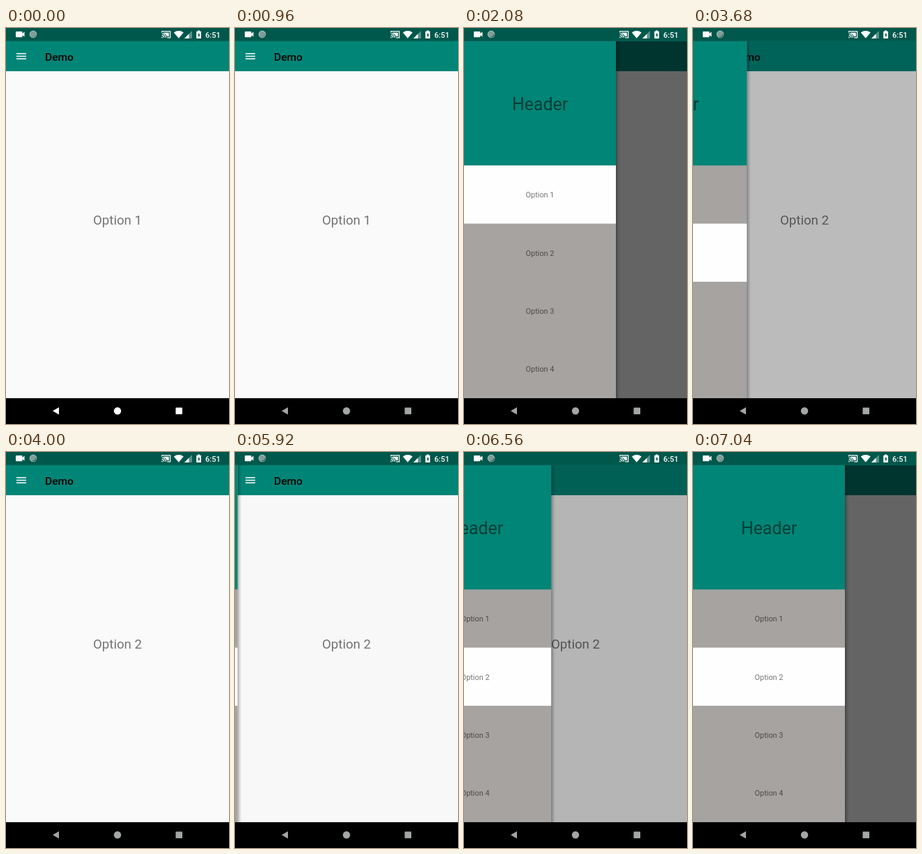
These frames come from a looping animation (320 by 568 pixels, 8000 ms). An HTML page:

```html
<!DOCTYPE html>
<html lang="en">
<head>
<meta charset="utf-8">
<title>Drawer demo</title>
<style>
  html, body { margin: 0; width: 100%; height: 100%; overflow: hidden; background: #000; }
  svg { display: block; width: 100vw; height: 100vh; }
  text { font-family: Roboto, sans-serif; fill: rgba(0, 0, 0, .54); }
  .mid { text-anchor: middle; }
  .medium { font-weight: 500; }
  .white { fill: #fff; }
  .line { fill: none; stroke: #fff; stroke-width: 1.2; }
</style>
</head>
<body>
<svg viewBox="0 0 320 568">
  <defs>
    <clipPath id="stage"><rect y="18.7" width="320" height="512.3"/></clipPath>
    <linearGradient id="shade">
      <stop offset="0" stop-opacity=".34"/>
      <stop offset=".45" stop-opacity=".13"/>
      <stop offset="1" stop-opacity="0"/>
    </linearGradient>
  </defs>

  <g id="page">
    <rect y="62" width="320" height="469" fill="#fafafa"/>
    <rect y="18" width="320" height="44" fill="#008577"/>
    <path class="white" d="M15 36h14v1.5h-14zM15 39.8h14v1.5h-14zM15 43.6h14v1.5h-14z"/>
    <text class="medium" x="56" y="46.6" font-size="15.56" style="fill:#000">Demo</text>
    <text class="mid" id="choice" x="160" y="282" font-size="18.67">Option 1</text>
  </g>
  <rect id="scrim" y="18.7" width="320" height="512.3" opacity="0"/>

  <g clip-path="url(#stage)">
    <g id="drawer">
      <rect x="218" y="18" width="6" height="513" fill="url(#shade)"/>
      <rect y="18" width="218" height="513" fill="#a6a3a1"/>
      <rect y="18" width="218" height="179.2" fill="#008577"/>
      <rect id="marker" width="218" height="83.4" fill="#fefefe"/>
      <text class="mid" x="109" y="118" font-size="24.9">Header</text>
      <g id="items" class="mid" font-size="10.9"></g>
    </g>
  </g>

  <!-- status bar -->
  <rect width="320" height="18.7" fill="#00574b"/>
  <path class="white" d="M15 5h7.5q1 0 1 1v2l3-2.4v7l-3-2.4v2q0 1-1 1h-7.5q-1 0-1-1v-6.200q0-1 1-1z"/>
  <circle cx="39" cy="9" r="4.8" fill="#7f9f99" stroke="#b3c5c2"/>
  <path id="arc" d="M43 8.500a4 4 0 0 1-5 4.300" fill="none" stroke="#2f6b62" stroke-width="1.300"/>
  <path class="line" d="M223.700 6.500v-1.700h12v9h-4.500M223.700 8.200a5.600 5.600 0 0 1 5.600 5.600M223.700 10.700a3.100 3.100 0 0 1 3.100 3.100"/>
  <path class="white" d="M226 6.700h7.800v5.300h-2.800q-1.200-3.300-5-4.500zM223.200 12.400a1.900 1.900 0 0 1 1.900 1.900h-1.900z"/>
  <path class="white" d="M240.800 6.500q7-4.800 14 0l-7 8.200z"/>
  <path class="white" d="M267 4v11h-11z" opacity=".35"/>
  <path class="white" d="M262.500 8.500v6.500h-6.500z"/>
  <path class="white" d="M275.200 3.500h2.800v1.200h2v10.300h-6.800v-10.300h2z"/>
  <path d="M277.300 6.500l-2.400 4h1.500v3l2.400-4h-1.500z" fill="#00574b"/>
  <text class="medium" x="286" y="13.6" font-size="11" style="fill:#fff">6:51</text>

  <!-- navigation bar -->
  <rect y="531" width="320" height="37"/>
  <g id="nav">
    <path d="M67 549.200l9-5.200v10.400z" stroke-linejoin="round"/>
    <circle cx="160" cy="549.200" r="5.200"/>
    <rect x="243.500" y="544.500" width="9.500" height="9.500" rx=".5"/>
  </g>
</svg>
<script>
  const LOOP = 8000, STEP = 160, WIDTH = 218, ROW = 83.4, TOP = 197.2;
  const $ = id => document.getElementById(id);
  const clamp = v => Math.max(0, Math.min(1, v));
  const lerp = (a, b, u) => a + (b - a) * clamp(u);

  // Quintic deceleration used by the drawer when it is let go.
  const settle = (t, start, time, from, to) =>
    lerp(from, to, 1 + (clamp((t - start) / time) - 1) ** 5);

  function reach(t) {
    if (t < 3584) return settle(t, 1617, 512, 0, WIDTH);
    if (t < 5850) return settle(t, 3584, 512, WIDTH, 0);
    if (t < 6080) return lerp(0, 12, (t - 5850) / 230);
    if (t < 6520) return lerp(12, 56, (t - 6080) / 160);
    return settle(t, 6520, 380, 56, WIDTH);
  }

  for (let i = 0; i < 4; i++) {
    const item = document.createElementNS("http://www.w3.org/2000/svg", "text");
    item.setAttribute("x", WIDTH / 2);
    item.setAttribute("y", TOP + ROW * i + 46);
    item.textContent = "Option " + (i + 1);
    $("items").append(item);
  }

  function draw(t) {
    const open = reach(t), row = t < 3680 ? 0 : 1;
    $("drawer").setAttribute("transform", `translate(${open - WIDTH} 0)`);
    $("drawer").setAttribute("visibility", open < .5 ? "hidden" : "visible");
    // The dimming trails the drawer by one screen refresh.
    $("scrim").setAttribute("opacity", .6 * reach(Math.max(0, t - 16)) / WIDTH);
    $("marker").setAttribute("y", TOP + ROW * row);
    $("choice").textContent = "Option " + (row + 1);
    $("arc").setAttribute("opacity", t >= 1760 && t < 6880 ? 1 : .4);
    const u = t / 750;
    $("nav").setAttribute("fill", `rgb(${lerp(255, 162, u)},${lerp(255, 167, u)},${lerp(255, 166, u)})`);
  }

  const begin = performance.now();
  function tick() {
    const t = (performance.now() - begin) % LOOP;
    draw(Math.floor(t / STEP) * STEP);
    requestAnimationFrame(tick);
  }
  tick();
</script>
</body>
</html>
```
